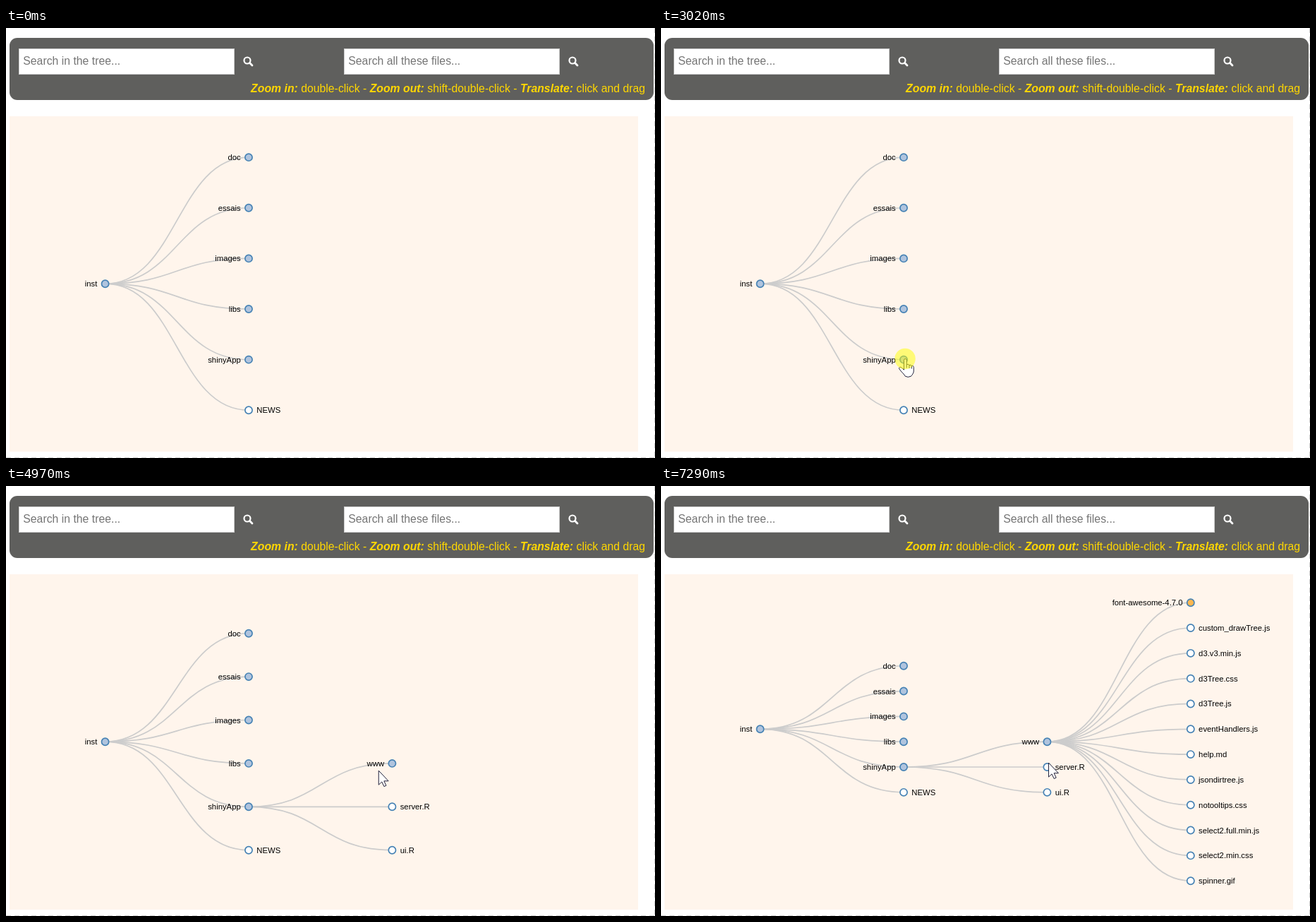
Recreate the animation shown at these times as an HTML page. Size 920x609 px, loop 8000 ms.

```html
<!DOCTYPE html>
<html lang="en">
<head>
<meta charset="utf-8">
<title>Collapsible file tree</title>
<style>
  html, body { margin: 0; width: 100%; height: 100%; overflow: hidden; background: #fff; }
  svg { display: block; font-family: "Liberation Sans", Arial, sans-serif; }
  .hint { font-size: 15.8px; fill: #757575; }
  .help { font-size: 15.8px; fill: #ffd700; text-anchor: end; }
  .help tspan { font-weight: bold; font-style: italic; }
  .border { stroke: #d2d2d2; stroke-dasharray: 7 5; }
  #links path { fill: none; stroke: #ccc; stroke-width: 1.7; }
  #nodes circle { stroke: steelblue; stroke-width: 1.7; }
  #nodes text { font-size: 11.3px; }
  #cursor path { fill: #fff; stroke: #22223c; stroke-linejoin: round; }
</style>
</head>
<body>
<svg width="920" height="609" viewBox="0 0 920 609">
  <defs>
    <g id="search">
      <rect x="18.5" y="29.5" width="305" height="36" fill="#fff" stroke="#ccc"/>
      <g fill="none" stroke="#fff">
        <circle cx="342" cy="46" r="4.5" stroke-width="2.2"/>
        <path d="M345.6 49.6L349 53" stroke-width="2.8" stroke-linecap="round"/>
      </g>
    </g>
  </defs>
  <rect x="5" y="14" width="913" height="88" rx="11" fill="#5f5f5d"/>
  <use href="#search"/>
  <use href="#search" x="461"/>
  <text class="hint" x="24.3" y="52">Search in the tree...</text>
  <text class="hint" x="485.3" y="52">Search all these files...</text>
  <text class="help" x="906" y="91">
    <tspan>Zoom in:</tspan> double-click - <tspan>Zoom out:</tspan> shift-double-click - <tspan>Translate:</tspan> click and drag</text>
  <path class="border" d="M919.5 0V609"/>
  <path class="border" d="M0 608.5H920"/>
  <rect x="5" y="125" width="891" height="475" fill="#fff5ec"/>
  <g id="links"></g>
  <g id="nodes"></g>
  <g id="cursor">
    <path id="arrow" d="M.5 .5V20.6L5 16.4 8.2 23 11.2 21.6 8.1 15.2H14.4Z"/>
    <path id="hand" d="M-1.6 2A1.9 1.9 0 0 1 2.2 2V8.8C3 7.3 5.7 7.5 5.9 9.4C7 8.2 9 8.6 9.2 10.4C10.3 9.4 12.2 10 12.2 12V17.5C12.2 20.5 10 22.5 8.5 24.7Q4 27 .2 24.7C-1 22 -5 19 -8.2 14.4C-9.4 12 -6.6 10.8 -4.6 12.8L-1.6 15.6ZM2.2 8.8V13M5.9 9.4V13.4M9.2 10.4V14"/>
  </g>
  <circle id="click" r="14.7" fill="#ff0" fill-opacity=".5"/>
</svg>
<script>
const LOOP = 8000, OPEN = [3264, 6284], OPEN_MS = 510;
const $ = id => document.getElementById(id);
const clamp = v => Math.max(0, Math.min(1, v));
const lerp = (a, b, k) => a + (b - a) * k;
const cubic = k => k < .5 ? 4 * k ** 3 : 1 - 4 * (1 - k) ** 3;
const show = (el, on) => el.style.display = on ? '' : 'none';

function add(parent, tag, attrs = {}) {
  const el = document.createElementNS('http://www.w3.org/2000/svg', tag);
  for (const key in attrs) el.setAttribute(key, attrs[key]);
  parent?.append(el);
  return el;
}

// Layout for the three tree states: row spacing and the row at mid height
const STEP = [71.62, 61.4, 35.82], MID_ROW = [2.5, 2.5, 3];
const FOLDER = '#b0c4de';
const nodes = [];

function addNode(name, parent, row, fill) {
  const depth = parent ? parent.depth + 1 : 0;
  const node = { parent, row, depth, fill, born: Math.max(0, depth - 1) };
  if (parent) node.link = add($('links'), 'path');
  node.g = add($('nodes'), 'g');
  node.circle = add(node.g, 'circle', { fill: '#fff' });
  node.label = add(node.g, 'text', { x: fill ? -11.3 : 11.3, y: 4, 'text-anchor': fill ? 'end' : 'start' });
  node.label.textContent = name;
  nodes.push(node);
  return node;
}

const root = addNode('inst', null, 2.5, FOLDER);
['doc', 'essais', 'images', 'libs'].forEach((name, i) => addNode(name, root, i, FOLDER));
const app = addNode('shinyApp', root, 4, FOLDER);
addNode('NEWS', root, 5);
const www = addNode('www', app, 3, FOLDER);
addNode('server.R', app, 4);
addNode('ui.R', app, 5);
addNode('font-awesome-4.7.0', www, -2.5, '#ffb74f');
['custom_drawTree.js', 'd3.v3.min.js', 'd3Tree.css', 'd3Tree.js', 'eventHandlers.js', 'help.md',
  'jsondirtree.js', 'notooltips.css', 'select2.full.min.js', 'select2.min.css', 'spinner.gif']
  .forEach((name, i) => addNode(name, www, i - 1.5));

// Nodes not yet open sit on their parent
function place(node, state) {
  if (state < node.born) return place(node.parent, state);
  return [140.6 + 203.4 * node.depth, 362.2 + STEP[state] * (node.row - MID_ROW[state])];
}

function drawTree(p1, p2) {
  for (const node of nodes) {
    const [a, b, c] = [0, 1, 2].map(s => place(node, s));
    const [x, y] = [0, 1].map(i => lerp(lerp(a[i], b[i], p1), c[i], p2));
    const grow = [1, p1, p2][node.born];
    Object.assign(node, { x, y });
    show(node.g, grow > 0);
    node.g.setAttribute('transform', `translate(${x} ${y})`);
    node.circle.setAttribute('r', 5.1 * grow);
    if (node.fill) node.circle.style.fill = `color-mix(in srgb, ${node.fill} ${grow * 100}%, ${FOLDER})`;
    node.label.setAttribute('fill-opacity', grow);
    if (!node.link) continue;
    const from = node.parent, mid = (from.x + x) / 2;
    show(node.link, grow > 0);
    node.link.setAttribute('d', `M${from.x} ${from.y}C${mid} ${from.y} ${mid} ${y} ${x} ${y}`);
  }
}

// Pointer path: time, x, y
const PATH = [
  [780, 477, 601], [1000, 438, 572], [1250, 385, 525], [1430, 341, 481], [1500, 330, 470],
  [1550, 333, 468], [1620, 342, 468], [1830, 346, 468.5], [4280, 346, 468.5], [4500, 385, 455],
  [4800, 485, 418], [5000, 535, 400], [5110, 547, 396], [5510, 549, 391.5], [LOOP, 549, 391.5]
];

function drawPointer(t, p1, p2) {
  const i = Math.max(1, PATH.findIndex(k => k[0] > t));
  const [a, b] = [PATH[i - 1], PATH[i]];
  const k = clamp((t - a[0]) / (b[0] - a[0]));
  const move = `translate(${lerp(a[1], b[1], k)} ${lerp(a[2], b[2], k)})`;
  const hand = t >= 1490 && p1 < .4 || t >= 5090 && p2 < .4;
  show($('cursor'), t >= 790);
  $('cursor').setAttribute('transform', move);
  show($('hand'), hand);
  show($('arrow'), !hand);
  show($('click'), [3020, 6040].some(c => t >= c && t < c + 200));
  $('click').setAttribute('transform', move);
}

function frame(now) {
  const t = now % LOOP;
  const [p1, p2] = OPEN.map(start => cubic(clamp((t - start) / OPEN_MS)));
  drawTree(p1, p2);
  drawPointer(t, p1, p2);
}

const begin = performance.now();
function tick() {
  frame(performance.now() - begin);
  requestAnimationFrame(tick);
}
tick();
</script>
</body>
</html>
```
